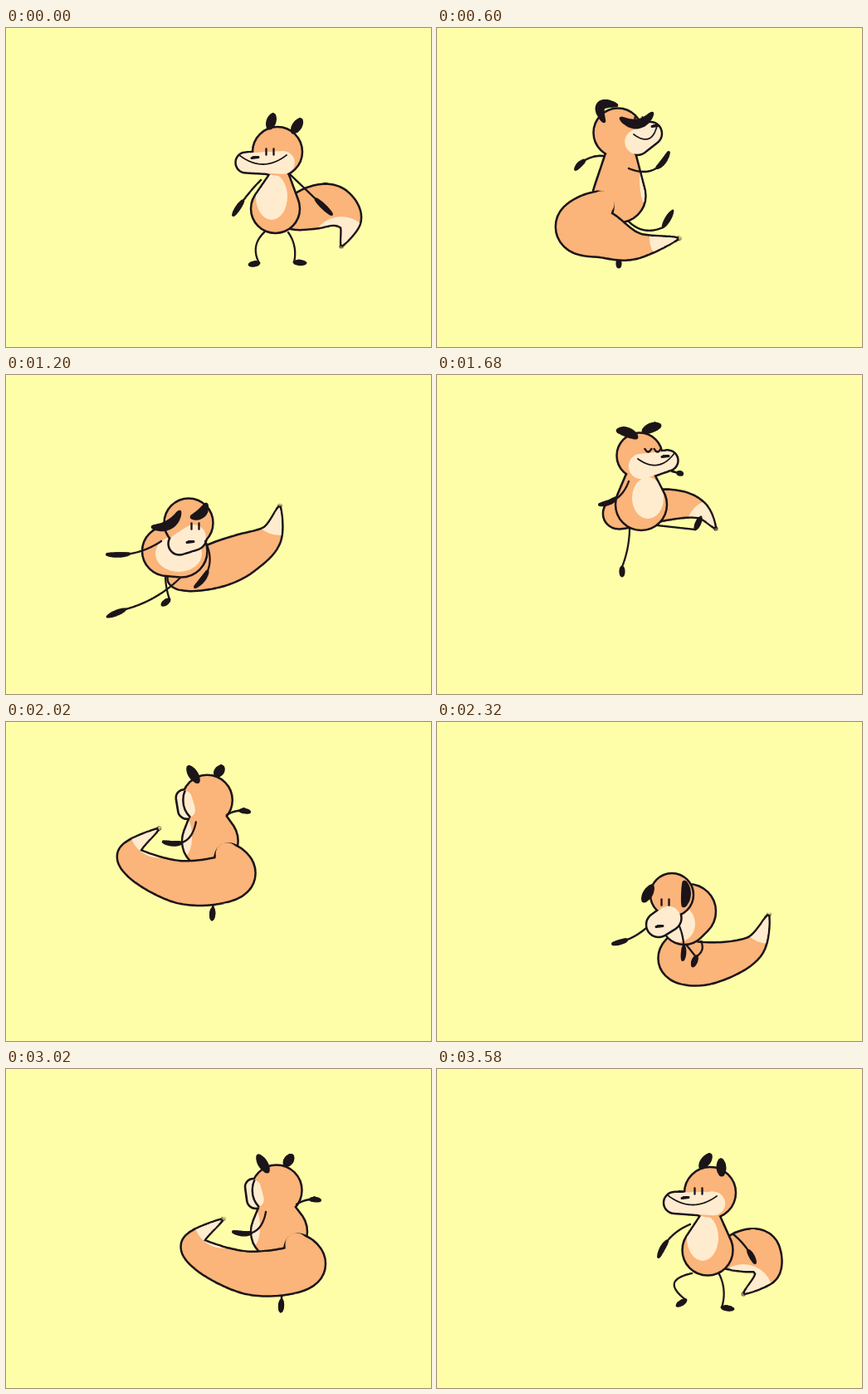
An HTML page with a canvas that plays this animation: 512 px wide and 384 px high, repeating every 3.64 s.

```html
<!DOCTYPE html>
<html lang="en">
<head>
<meta charset="utf-8">
<title>Dancing fox</title>
<style>
html, body { margin: 0; width: 100%; height: 100%; overflow: hidden; background: #fffea8; }
canvas { display: block; width: 512px; height: 384px; }
</style>
</head>
<body>
<canvas id="stage" width="512" height="384"></canvas>
<script>
const LOOP = 3640, STEP = 40, LINE = 2.5;
const INK = '#1b1519', FUR = '#fbb479', CREAM = '#ffeccf', BG = '#fffea8';
const ctx = document.getElementById('stage').getContext('2d');

// head: x, y, r        muzzle, body: two round ends      belly: x, y, rx, ry
// face: nose, eyes, how far the lids are shut            ears, arms: from, to, bend
// legs: hip, ankle, toe, bend                            tail: spine points, thickness
const stand = {
  head: [327,149, 30], muzzle: [289,162,12.5, 334,162,15], face: [300,156, 318,149, 0],
  earL: [317,120, 322,105, 0], earR: [346,125, 355,111, 0],
  body: [329,182,13, 324.5,217.5,29.5], belly: [320,203, 19,28],
  armL: [307,183, 274,225, 3], armR: [343,177, 392,224, 0],
  legL: [311,246, 305,283, 293,285, 14], legR: [340,246, 347,282, 361,283, -8],
  tail: [340,228, 368,217, 395,214, 414,232, 404,263, 26], smile: true
};
const strut = {
  ...stand,
  head: [329,149, 31], muzzle: [286,161,13, 333,162,15.5], face: [299,155, 315,147, 0],
  earL: [318,118, 329,104, 0], earR: [343,127, 342,110, 0],
  body: [329,182,13, 326,218,30.5],
  armL: [305,187, 267,226, 12], armR: [357,199, 383,233, -5],
  legL: [307,246, 300,278, 289,285, 36], legR: [340,247, 343,287, 357,289, -8],
  tail: [345,225, 372,219, 390,221, 397,246, 369,271, 26]
};
const twirl = {
  head: [218,126, 29.5], muzzle: [257,127,14, 241,137,16], face: [263,118, 243,111, 0],
  earL: [201,112, 216,93, -28], earR: [222,109, 259,103, 19],
  body: [221,160,20, 219.5,202,32], belly: [253,182, 9,32],
  armL: [200,154, 167,170, 10], armR: [231,169, 279,150, 25],
  legL: [219,268, 219,279, 219,288, 0], legR: [231,233, 272,240, 284,220, 14],
  tail: [199,211, 173,238, 198,248, 238,262, 292,253, 31], tailFront: true, smile: true
};
const lunge = {
  head: [220,178, 29.5], muzzle: [209,203,13.5, 226,195,16], face: [222,201, 228,182, 0],
  earL: [209,165, 177,183, -14], earR: [241,156, 224,171, -8],
  body: [194,212,30, 211,212,31.5], belly: [208,215, 28,22],
  armL: [187,200, 122,216, -12], armR: [240,200, 228,255, -22],
  legL: [210,244, 144,282, 122,291, -10], legR: [192,243, 197,270, 188,277, 2],
  tail: [205,245, 248,231, 285,216, 318,195, 330,157, 27], apart: true
};
const leap = {
  head: [244,97, 27.5], muzzle: [278,103,12.5, 246,110,16.5], face: [275,98, 260,89, 1],
  earL: [240,75, 218,67, 4], earR: [249,68, 268,61, -2],
  body: [245,130,20, 246,156,31], belly: [254,148, 19,25],
  armL: [231,128, 196,156, -14], armR: [283,116, 295,119, 0],
  legL: [232,186, 223,231, 223,242, -4], legR: [265,181, 311,186, 318,171, 0],
  tail: [228,168, 221,166, 280,156, 316,162, 336,185, 20], smile: true
};
const crouch = {
  head: [283,208, 26], muzzle: [267,244,15, 279,236,15.5], face: [268,246, 275,217, 0],
  earL: [259,198, 249,215, 0], earR: [298,193, 297,221, -5],
  body: [303,228,33, 298,240,28], belly: [291,243, 20,22],
  armL: [252,248, 212,267, -6], armR: [292,246, 296,286, -6],
  legL: [300,268, 312,283, 308,294, 0], legR: [318,264, 313,282, 308,293, -8],
  tail: [300,262, 293,286, 330,290, 380,272, 400,231, 27], apart: true
};
const back = {
  head: [326,146, 30.5], muzzle: [298,142,10, 301,157,11], face: [298,142, 311,117, 0],
  earL: [315,123, 304,105, 0], earR: [337,115, 344,105, 0],
  body: [326,174,23, 329,196,34], belly: [297,190, 9,24],
  armL: [313,172, 274,196, -26], armR: [350,163, 378,158, -6],
  legL: [332,262, 332,278, 331,292, 0], legR: [332,262, 332,278, 331,292, 0],
  tail: [350,211, 356,238, 290,245, 225,214, 262,180, 28], tailFront: true, turned: true
};

// Time, pose, offset
const track = [
  [0, stand, 0, 0], [40, stand, 0, 0], [600, twirl, 0, 0], [1080, lunge, -30, 6],
  [1200, lunge, 0, 0], [1320, lunge, 12, 12], [1680, leap, 0, 0], [1960, back, -85, -56],
  [2320, crouch, 0, 0], [2520, crouch, 34, -4], [2760, crouch, 38, -22],
  [3000, back, 0, 0], [3440, strut, 16, 0], [3560, strut, 0, 0], [LOOP, strut, 0, 0]
];

const lerp = (a, b, u) => a + (b - a) * u;
const clamp = (v, lo, hi) => Math.max(lo, Math.min(hi, v));

function poseAt(t) {
  const i = track.findIndex(k => k[0] > t);
  const [t0, a, ax, ay] = track[i - 1], [t1, b, bx, by] = track[i];
  const s = (t - t0) / (t1 - t0), u = s * s * (3 - 2 * s);
  const pose = { ...(u < 0.5 ? a : b), dx: lerp(ax, bx, u), dy: lerp(ay, by, u) };
  for (const key in a)
    if (Array.isArray(a[key])) pose[key] = a[key].map((n, j) => lerp(n, b[key][j], u));
  return pose;
}

// Curve from one point to another, bowed sideways by bend
function bow(x0, y0, x1, y1, bend = 0) {
  const dx = x1 - x0, dy = y1 - y0, k = bend / (Math.hypot(dx, dy) || 1);
  return s => {
    const sag = 2 * s * (1 - s) * k;
    return [x0 + dx * s - dy * sag, y0 + dy * s + dx * sag];
  };
}

// Smooth curve through evenly timed points
function spline(p) {
  const last = p.length / 2 - 1;
  return s => {
    const i = Math.min(last - 1, Math.floor(s * last)), u = s * last - i;
    return [0, 1].map(axis => {
      const [a, b, c, d] = [-1, 0, 1, 2].map(k => p[2 * clamp(i + k, 0, last) + axis]);
      return b + u / 2 * (c - a + u * (2 * a - 5 * b + 4 * c - d + u * (3 * (b - c) + d - a)));
    });
  };
}

// Discs along a curve, merged into one shape
function tube(curve, radius, count = 80) {
  const path = new Path2D();
  for (let i = 0; i <= count; i++) {
    const s = i / count, [x, y] = curve(s), r = Math.max(0.1, radius(s));
    path.moveTo(x + r, y);
    path.arc(x, y, r, 0, 2 * Math.PI);
  }
  return path;
}

const inset = r => r - LINE / 2;
const disc = (x, y, r) => tube(() => [x, y], () => r, 0 || 1);
const capsule = ([x0, y0, r0, x1, y1, r1]) =>
  tube(bow(x0, y0, x1, y1), s => inset(lerp(r0, r1, s)), 50);
const leaf = s => Math.sqrt(Math.sin(Math.PI * (0.05 + 0.9 * clamp(s, 0, 1))));
const tailWidth = s => Math.sin(Math.PI * Math.pow(0.05 + 0.95 * s, 0.7));

function fill(path, color) {
  ctx.fillStyle = color;
  ctx.fill(path);
}

function within(clip, paint) {
  ctx.save();
  ctx.clip(clip);
  paint();
  ctx.restore();
}

// Fills laid on top hide the inner half of each line, so joined shapes share one contour
function outline(...paths) {
  ctx.lineWidth = 2 * LINE;
  paths.forEach(path => ctx.stroke(path));
}

function line(curve, width) {
  fill(tube(curve, () => width / 2, 60), INK);
}

function arm(p) {
  fill(tube(bow(...p), s => s < 0.62 ? 1.2 : 1.2 + 2.1 * leaf((s - 0.62) / 0.38)), INK);
}

function leg([hipX, hipY, x, y, toeX, toeY, bend]) {
  line(bow(hipX, hipY, x, y, bend), 2.4);
  fill(tube(bow(x, y, toeX, toeY), s => 3.6 * leaf(s), 30), INK);
}

function tail(p) {
  const spine = p.tail.slice(0, -1), size = p.tail.at(-1);
  const shape = tube(spline(spine), s => inset(size * tailWidth(s)), 120);
  outline(shape);
  fill(shape, FUR);
  within(shape, () => fill(disc(...spine.slice(-2), 36), CREAM));
  if (p.tailFront) fill(disc(spine[0], spine[1], size * tailWidth(0) + 3), FUR);
}

function torso(p) {
  const [x, y, r] = p.head, belly = new Path2D();
  const head = disc(x, y, inset(r)), muzzle = capsule(p.muzzle), body = capsule(p.body);
  belly.ellipse(...p.belly, 0, 0, 2 * Math.PI);
  outline(body);
  if (!p.apart) outline(head, muzzle);
  fill(body, FUR);
  within(body, () => fill(belly, CREAM));
  if (p.apart) outline(head, muzzle);
  fill(head, FUR);
  fill(muzzle, CREAM);
  if (p.turned) within(muzzle, () => {
    ctx.lineWidth = LINE;
    ctx.stroke(head);
  });
}

function face(p) {
  const [nx, ny, ex, ey, lid] = p.face, [x0, y0, , x1, y1] = p.muzzle;
  if (!p.turned) {
    line(bow(nx - 4, ny + 0.5, nx + 4, ny - 0.5), 3);
    for (const side of [-4.5, 4.5]) {
      const x = ex + side * (1 + lid / 4), w = 4 * lid, h = 3.5 * (1 - lid);
      line(bow(x - w, ey - h, x + w, ey + h, 7 * lid), 2.4);
    }
  }
  if (p.smile) {
    const out = Math.sign(x0 - x1);
    line(bow(x0 + out * 8, y0 - 9, x1 - out * 4, y1 - 9, -out * 22), 1.8);
  }
  for (const ear of [p.earL, p.earR]) fill(tube(bow(...ear), s => 6 * leaf(s), 50), INK);
}

function draw(p) {
  ctx.fillStyle = BG;
  ctx.fillRect(0, 0, 512, 384);
  ctx.strokeStyle = INK;
  ctx.save();
  ctx.translate(p.dx, p.dy);
  if (!p.tailFront) tail(p);
  leg(p.legL);
  leg(p.legR);
  torso(p);
  if (p.tailFront) tail(p);
  arm(p.armL);
  arm(p.armR);
  face(p);
  ctx.restore();
}

function tick() {
  const t = performance.now() % LOOP;
  draw(poseAt(Math.floor(t / STEP) * STEP));
  requestAnimationFrame(tick);
}
tick();
</script>
</body>
</html>
```
